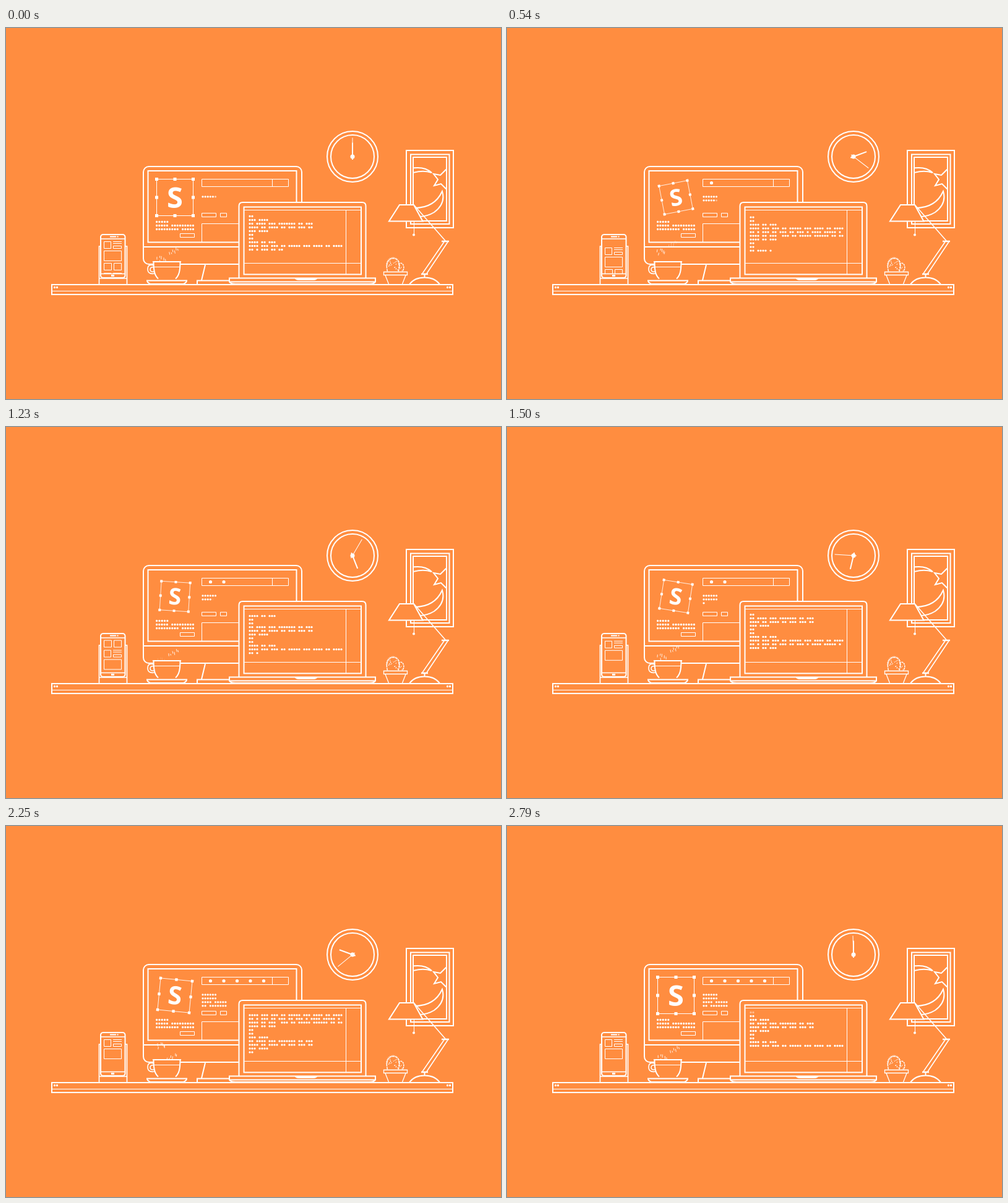
Animation, 800 px wide and 600 px high, one loop 2820 ms. Source, as an HTML page:

```html
<!DOCTYPE html>
<html lang="en">
<head>
<meta charset="utf-8">
<title>Desk</title>
<style>
  html, body { margin: 0; width: 100%; height: 100%; overflow: hidden; background: #ff8d40; }
  svg { display: block; width: 800px; height: 600px; fill: none; stroke: #fff; stroke-width: 2; }
  .thin { stroke-width: 1; }
  .solid { fill: #ff8d40; }
  .white { fill: #fff; stroke: none; }
  .dots { stroke-width: 3.3; stroke-linecap: round; }
  text { font: 700 47px "Noto Sans", "Open Sans", sans-serif; text-anchor: middle; fill: #fff; stroke: none; }
</style>
</head>
<body>
<svg viewBox="0 0 800 600">
  <defs>
    <clipPath id="posterClip"><rect x="659" y="210" width="52" height="102"/></clipPath>
    <clipPath id="phoneClip"><rect x="154" y="342" width="37" height="55"/></clipPath>
    <clipPath id="steamClip"><rect x="240" y="344" width="40" height="33"/></clipPath>
    <g id="tilesTop" class="thin">
      <path d="M158.5 345.5h11v11h-11zM173 345.5h14M173 348.5h14M173.5 352.5h13v4h-13z"/>
    </g>
  </defs>

  <!-- wall clock -->
  <circle cx="560" cy="208" r="41"/>
  <circle cx="560" cy="208" r="35"/>
  <g transform="translate(560 208)">
    <path id="minute" class="thin" d="M0 5V-30.5"/>
    <path id="hour" d="M0 5V-22.5"/>
    <circle class="white" r="3.5"/>
  </g>

  <!-- poster -->
  <path d="M647 198h76v125h-76zM654 204.500h62.500v112.500h-62.500zM658 209h54v103h-54z"/>
  <g clip-path="url(#posterClip)">
    <path d="M655 227Q676 223 688 234Q673 229 655 235M655 291Q692 293 705 264Q711 284 692 298Q679 306 664 305"/>
    <path d="M722 262L711 260L703 252L692 255L698 245L691 236L702 238L711 229L722 226"/>
  </g>

  <!-- lamp -->
  <path d="M659.500 313V333" class="thin"/>
  <circle class="white" cx="659" cy="334.500" r="2"/>
  <path class="solid" d="M636 286h23l14.500 26.500H619z"/>
  <path d="M660 287L710 344" stroke-width="1.600"/>
  <path d="M673 397L708 346M680 397L714 346" stroke-width="1.600"/>
  <path d="M704 345h12M671 398h11" stroke-width="2.600"/>
  <path d="M676.500 398v6M652 414.500Q660 403.500 676.500 403.500T701 414.500"/>

  <!-- cactus -->
  <g class="thin">
    <path d="M616.500 393.500C613 380 618 372.500 626 372.500S638 380 634 393.500" stroke-dasharray="4 1" stroke-width="1.500"/>
    <path d="M634 382C640 376 646 386 641 393.500" stroke-dasharray="3 1" stroke-width="1.500"/>
    <path id="spines"/>
    <path d="M610.500 394.500h38v5h-38zM613 400l5.500 14M646 400l-5.500 14" stroke-width="1.300"/>
  </g>

  <!-- monitor -->
  <rect x="222" y="224" width="256" height="158" rx="9"/>
  <path d="M229.500 231h240v115.500h-240zM222 354h256"/>
  <path d="M322 383l-6 25M361 408.500h-52v6"/>
  <g class="thin">
    <path d="M316.500 244.500h140v12h-140zM430.500 244v12M316.500 299.500h23v6h-23zM346.500 299.500h10v6h-10zM281.500 332.500h23v6h-23zM316.500 346v-29.500H400"/>
  </g>
  <path id="caption" class="dots"/>
  <path id="typed" class="dots"/>
  <path id="typedTail" class="dots"/>
  <g id="pins" class="white"></g>
  <g id="logo" class="thin">
    <rect x="-29.500" y="-29.500" width="59" height="59"/>
    <path id="grips" class="white"/>
    <text y="16.700">S</text>
  </g>

  <!-- laptop -->
  <path class="solid" d="M376.500 404V288q0-6 6-6h193q6 0 6 6V404"/>
  <path d="M384.500 289.500h189.500v109h-189.500z"/>
  <path class="thin" d="M385 294.500h188M385 380.500h188M549.500 294v104"/>
  <g id="code" class="dots"></g>
  <path class="solid" d="M361 404.500h236v6q-2 3.500-10 3.500H371q-8 0-10-3.500zM361 410.500h236"/>
  <path class="white" d="M466 404h38q-2 4-7 4h-24q-5 0-7-4z"/>

  <!-- cup -->
  <g id="steam" clip-path="url(#steamClip)" stroke-width="1"></g>
  <path d="M239 384Q229 381 229 390T241 397M239 387Q233 386 233 390.500T239 394" stroke-width="1.600"/>
  <path class="solid" d="M246 405.500C240 400 238.500 392 238.500 378H281.500C281.500 392 280 400 274 405.500"/>
  <path d="M237 378h46"/>
  <path class="thin" d="M238 386.500h44"/>
  <path d="M228 408.500h64q0 3-5 5.500h-54q-5-2.500-5-5.500z"/>

  <!-- phone -->
  <path d="M153 353h-2.500v61M192.500 353h3v61M150.500 405h45" stroke-width="1.700"/>
  <rect class="solid" x="153" y="334" width="39.500" height="70" rx="4"/>
  <path d="M153 341h39M153 397.500h39" stroke-width="1.600"/>
  <path d="M168 337.500h10M179.500 337.500h2"/>
  <path d="M170 400.500h5" stroke-width="3"/>
  <g clip-path="url(#phoneClip)">
    <g id="feed">
      <use href="#tilesTop"/>
      <path class="thin" d="M158.500 360.500h28v16h-28zM158.500 380.500h12v11h-12zM174.500 380.500h12v11h-12z"/>
      <use href="#tilesTop" y="51"/>
      <path class="thin" d="M158.500 411.500h28v16h-28z"/>
    </g>
  </g>

  <!-- shelf -->
  <path d="M74 415h648v16H74z"/>
  <path class="thin" d="M74 425.500h648"/>
  <path class="dots" d="M78.500 419.500h0M82.500 419.500h0M713.500 419.500h0M717.500 419.500h0" stroke-width="3"/>
</svg>

<script>
const LOOP = 2820, STEP = 30, TURN = 2792;
const $ = id => document.getElementById(id);
const clamp = v => Math.max(0, Math.min(1, v));
const smooth = u => u * u * (3 - 2 * u);

function add(parent, tag, attrs = {}) {
  const el = document.createElementNS('http://www.w3.org/2000/svg', tag);
  for (const k in attrs) el.setAttribute(k, attrs[k]);
  return parent.appendChild(el);
}

function random(seed) {
  return () => (seed = seed * 16807 % 2147483647) / 2147483647;
}

// keys: [time, value] pairs
function track(keys, t, ease = u => u) {
  let i = 1;
  while (i < keys.length - 1 && t > keys[i][0]) i++;
  const [t0, a] = keys[i - 1], [t1, b] = keys[i];
  return a + (b - a) * ease(clamp((t - t0) / (t1 - t0)));
}

// word lengths -> column numbers of the dots
function columns(words) {
  const out = [];
  let col = 0;
  for (const n of words) {
    for (let i = 0; i < n; i++) out.push(col++);
    col++;
  }
  return out;
}
const dot = (x, y) => `M${x.toFixed(2)} ${y}h0`;

// monitor texts
const row = (words, x, y, pitch) => columns(words).map(c => dot(x + c * pitch, y));
$('caption').setAttribute('d', [
  ...row([5], 243.6, 313.5, 4.3),
  ...row([5, 9], 243.6, 319.5, 4.2),
  ...row([9, 5], 243.6, 325.5, 4.2)
].join(''));
const typedDots = [[6], [6], [4, 5], [2, 7]]
  .flatMap((words, i) => row(words, 318, 272.8 + i * 6, 4.1));
const typedKeys = [[0, 5.6], [540, 11.4], [600, 12], [850, 6], [990, 7.5],
  [1500, 13], [1830, 21.3], [2200, 30]];

const pinTimes = [300, 780, 1590, 1680, 1770];
const pins = pinTimes.map((_, i) =>
  add($('pins'), 'circle', { cx: 330.5 + i * 21.5, cy: 250.5, r: 2.6 }));

let grips = '';
for (const x of [-1, 0, 1]) for (const y of [-1, 0, 1])
  if (x || y) grips += `M${x * 29.5 - 2.5} ${y * 29.5 - 2.5}h5v5h-5z`;
$('grips').setAttribute('d', grips);

const tiltKeys = [[0, 0], [510, -11], [750, -11], [1480, 9], [1924, 9], [2700, 0]];
const sizeKeys = [[0, 1], [510, .79], [1924, .79], [2700, 1]];
const feedKeys = [[120, 0], [540, 10], [1570, -51]];

// laptop listing
const words = {
  a: [2], b: [3, 4], c: [2, 4, 3, 7, 2, 3], d: [4, 2, 4, 2, 3, 3, 2], f: [4, 2, 3],
  g: [4, 3, 3, 2, 5, 3, 4, 2, 4], h: [2, 1, 3, 2, 3, 2, 3, 1, 4, 5, 1],
  i: [4, 2, 3, 0, 3, 2, 5, 6, 2, 2]
};
let start = 0;
const lines = [...'abcdbaafghifaacdbaafghifaabcdbaafgh'].map(key => {
  const cols = columns(words[key]);
  const line = { cols, start, el: add($('code'), 'path') };
  start += cols[cols.length - 1] + 1;
  return line;
});
const cursorKeys = [[0, 137], [540, 222], [990, 290], [1500, 375],
  [1830, 426], [2250, 485.5], [2790, 537]];

function drawCode(t) {
  const top = 304.5 - 147 * t / 2790;
  const cursor = track(cursorKeys, t);
  lines.forEach(({ cols, start, el }, i) => {
    const y = top + i * 6;
    const alpha = clamp((y - 300) / 3.5);
    const shown = alpha ? cols.filter(c => start + c < cursor) : [];
    el.setAttribute('d', shown.map(c => dot(394 + c * 4, y)).join(''));
    el.setAttribute('opacity', alpha);
  });
}

// steam: two puffs of short strokes
const rnd = random(71);
const wisps = [];
for (const [x, w, phase] of [[244, 13, .15], [262, 15, .55]])
  for (let i = 0; i < 6; i++)
    wisps.push({
      x: x + w * (i + .5 * rnd()) / 5.5, dy: rnd() * 11 - 5, len: 2.5 + rnd() * 3,
      phase, el: add($('steam'), 'path')
    });

function drawSteam(t) {
  for (const { x, dy, len, phase, el } of wisps) {
    const p = (t / (LOOP / 2) + phase) % 1;
    const y = 376 - 31 * p + dy;
    const lean = 1.6 * Math.sin(y / 5 + phase * 9);
    el.setAttribute('d', `M${x + lean} ${y}l${lean * .6} ${len}`);
    el.setAttribute('opacity', .85 * clamp(p * 8) * clamp((1 - p) * 6));
  }
}

// cactus spines
const prick = random(19);
let spines = '';
for (let i = 0; i < 15; i++) {
  const a = Math.PI * (1 + i / 14), c = Math.cos(a), s = Math.sin(a);
  spines += `M${625.5 + 9 * c} ${384 + 11 * s}l${2.5 * c} ${2.5 * s}`;
}
for (let i = 0; i < 20; i++) {
  const x = i < 14 ? 619 + prick() * 13 : 635 + prick() * 6;
  const y = i < 14 ? 376 + prick() * 16 : 383 + prick() * 9;
  spines += `M${x} ${y}l${prick() * 4 - 2} ${1 + prick() * 1.5}`;
}
$('spines').setAttribute('d', spines);

function draw(t) {
  const angle = 360 * t / TURN;
  $('hour').setAttribute('transform', `rotate(${angle})`);
  $('minute').setAttribute('transform', `rotate(${angle * 7})`);

  const tilt = track(tiltKeys, t, smooth), size = track(sizeKeys, t, smooth);
  $('logo').setAttribute('transform', `translate(273 274) rotate(${tilt}) scale(${size})`);
  $('feed').setAttribute('transform', `translate(0 ${track(feedKeys, t, smooth)})`);

  const n = track(typedKeys, t), full = Math.floor(n);
  $('typed').setAttribute('d', typedDots.slice(0, full).join(''));
  $('typedTail').setAttribute('d', typedDots[full] || '');
  $('typedTail').setAttribute('opacity', n - full);
  pins.forEach((pin, i) => pin.setAttribute('opacity', t >= pinTimes[i] ? 1 : 0));

  drawCode(t);
  drawSteam(t);
}

const begin = performance.now();
function tick() {
  const t = (performance.now() - begin) % LOOP;
  draw(Math.floor(t / STEP) * STEP);
  requestAnimationFrame(tick);
}
tick();
</script>
</body>
</html>
```
